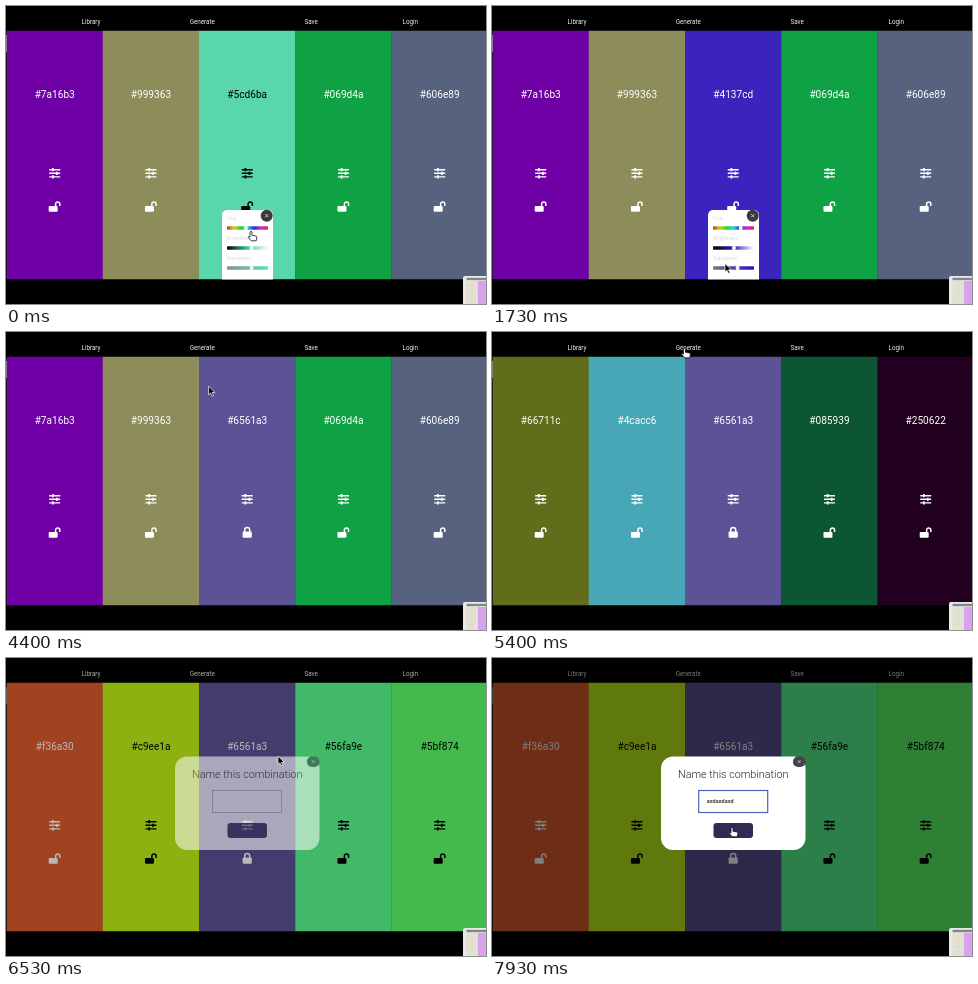
Recreate the animation shown at these times as an HTML page. Size 480 px wide and 298 px high, loop 8000 ms.

```html
<!DOCTYPE html>
<html lang="en">
<head>
<meta charset="utf-8">
<title>Palette generator</title>
<style>
  html, body { margin: 0; width: 100%; height: 100%; overflow: hidden; background: #000; }
  svg { display: block; width: 480px; height: 298px; }
  text { font-family: Roboto, Arial, sans-serif; }
  .nav { font-size: 6.3px; fill: #eee; text-anchor: middle; }
  .hex { font-size: 10.1px; text-anchor: middle; }
  .label { font-size: 5.3px; fill: #d9d9dd; }
  .title { font-size: 10.8px; font-weight: 300; fill: #222; text-anchor: middle; }
  .typed { font-size: 5.5px; font-weight: 500; fill: #222; }
</style>
</head>
<body>
<svg viewBox="0 0 480 298">
  <defs>
    <clipPath id="cols"><rect y="24.5" width="480" height="249"/></clipPath>
    <linearGradient id="hue"></linearGradient>
    <linearGradient id="bright"><stop/><stop offset=".5"/><stop offset="1" stop-color="#fff"/></linearGradient>
    <linearGradient id="sat"><stop/><stop offset="1"/></linearGradient>
    <g id="sliders">
      <path d="M-5.5-3.6h11M-5.5 0h11M-5.5 3.6h11" stroke="currentColor" stroke-width="1.4"/>
      <path d="M-1.8-5.2v3.2M2.2-1.6v3.2M-1.8 2v3.2" stroke="currentColor" stroke-width="1.7"/>
    </g>
    <g id="open">
      <rect x="-6" y="-.4" width="9" height="5.8" rx="1" fill="currentColor"/>
      <path d="M.9.2v-2.4a2.1 2.1 0 0 1 4.2 0v1.9" fill="none" stroke="currentColor" stroke-width="1.5"/>
    </g>
    <g id="shut">
      <rect x="-4.6" y="-.7" width="9.2" height="6.2" rx="1" fill="currentColor"/>
      <path d="M-2.5 0v-2.4a2.5 2.5 0 0 1 5 0V0" fill="none" stroke="currentColor" stroke-width="1.5"/>
    </g>
  </defs>
  <rect width="480" height="298"/>
  <g id="nav"></g>
  <g clip-path="url(#cols)">
    <g id="columns"></g>
    <g id="panel">
      <rect x="216" y="204" width="51" height="80" rx="5" fill="#fff"/>
      <circle cx="260.7" cy="209.7" r="6" fill="#3b3b3f"/>
      <path d="M259.2 208.2l3 3m0-3l-3 3" stroke="#ddd" stroke-width=".9"/>
    </g>
  </g>
  <path d="M.4 25v248" stroke="#222" stroke-width=".8"/>
  <path d="M.4 29v17" stroke="#aaa" stroke-width=".8"/>
  <rect id="dim" width="480" height="298"/>
  <g id="popup">
    <rect x="169" y="98.5" width="144.5" height="93.5" rx="12" fill="#fff"/>
    <rect x="301" y="98.5" width="12.5" height="10.5" rx="5" fill="#45424c"/>
    <path d="M305.8 102.2l2.8 2.8m0-2.8l-2.8 2.8" stroke="#ddd" stroke-width=".7"/>
    <text class="title" x="241.2" y="120">Name this combination</text>
    <rect id="field" x="206.7" y="132.5" width="69" height="22" fill="#fff"/>
    <text id="typed" class="typed" x="214.8" y="145.4"></text>
    <rect x="221.5" y="165" width="39.5" height="15" rx="3" fill="#312a54"/>
  </g>
  <g>
    <rect x="457" y="270" width="30" height="34" rx="2" fill="#e9e9ea"/>
    <path d="M460.500 273h20" stroke="#858585" stroke-width="2.4"/>
    <rect x="460" y="275" width="12" height="23" fill="#e3e1d2"/>
    <rect x="472" y="275" width="8" height="23" fill="#d9a2ec"/>
    <path d="M466 279v18" stroke="#bbb9aa" stroke-dasharray="1 3.500"/>
  </g>
  <g id="cursor">
    <path id="arrow" d="M0 0v8.600l2-1.800 1.500 3.200 1.500-.7-1.500-3h2.800z" fill="#000" stroke="#fff" stroke-width=".7"/>
    <path id="hand" d="M-1 1q1-1.600 2 0v3.200l4 .8q1 .3.9 1.500l-.7 3.300H.2L-2.800 6.300q-.1-1.300 1.800-.3z" fill="#fff" stroke="#111" stroke-width=".8" stroke-linejoin="round"/>
  </g>
</svg>
<script>
const LOOP = 8000, STEP = 1000 / 15;
const $ = id => document.getElementById(id);

function add(parent, tag, attrs, text) {
  const el = document.createElementNS('http://www.w3.org/2000/svg', tag);
  for (const k in attrs) el.setAttribute(k, attrs[k]);
  if (text) el.textContent = text;
  parent.appendChild(el);
  return el;
}

// Eased value(s) at time t from [time, ...values] points.
function track(points, t) {
  let i = 0;
  while (i < points.length - 1 && points[i + 1][0] <= t) i++;
  const a = points[i], b = points[i + 1] || a;
  let u = b === a ? 0 : Math.max(0, (t - a[0]) / (b[0] - a[0]));
  u = u * u * (3 - 2 * u);
  return a.slice(1).map((v, k) => v + (b[k + 1] - v) * u);
}

const HUE = [[70, 166.2], [330, 244]];
const LIGHT = [[600, .6], [870, .35], [1200, .51]];
const SAT = [[2470, .6], [2535, .27], [2800, .12], [3130, .264]];
const PANEL = [[3470, 0], [3970, 72]];
const FADE = [[6310, 0], [6730, 1]];
const PATH = [
  [70, 245, 225], [330, 251, 225], [470, 251, 225], [600, 246, 241],
  [870, 236, 241], [1200, 243, 241], [1270, 248, 241], [1530, 234, 257],
  [1670, 234, 257], [1730, 233, 257.5], [1930, 233, 257.5], [2070, 232, 261],
  [2470, 232, 261], [2800, 226, 261], [3130, 232, 261], [3260, 232, 261],
  [3400, 260, 211], [3600, 260, 211], [3970, 241, 199], [4160, 241, 199],
  [4500, 192.5, 16], [5800, 192.5, 16], [6050, 316.5, 15], [6270, 316.5, 15],
  [6530, 272, 98], [6860, 238, 142], [7000, 238, 142], [7330, 345, 85],
  [7500, 345, 85], [7870, 240, 169]
];
const ARROW = [[1400, 2400], [4170, 4450], [6330, 7800]];
const PALETTES = [
  [0, '7a16b3 999363 069d4a 606e89'],
  [4530, 'b84f7d 2f8a65 d9c25e 3b3f92'],
  [4930, '1c7fa0 e0a58c 7b2d40 a4d178'],
  [5270, '66711c 4cacc6 085939 250622'],
  [5600, '8d3fc1 35524a e3b04b 2b76d6'],
  [5800, 'f36a30 c9ee1a 56fa9e 5bf874']
].map(([at, s]) => [at, s.split(' ')]);

const rgbOf = hex => [0, 2, 4].map(i => parseInt(hex.substr(i, 2), 16));
const hexOf = rgb => rgb.map(v => v.toString(16).padStart(2, '0')).join('');

function hsl(h, s, l) {
  const a = s * Math.min(l, 1 - l);
  return [0, 8, 4].map(n => {
    const k = (n + h / 30) % 12;
    return Math.round(255 * (l - a * Math.max(-1, Math.min(k - 3, 9 - k, 1))));
  });
}

function tint([r, g, b]) {
  const d = g - (r + b) / 2;
  return `rgb(${[r * .91 + Math.max(0, d) * .08, g - 10 + d * .13, b * .92]
    .map(v => Math.round(Math.max(0, Math.min(255, v))))})`;
}

function isLight(rgb) {
  const [r, g, b] = rgb.map(v => (v / 255) ** 2.2);
  return .2126 * r + .7152 * g + .0722 * b > .5;
}

[['Library', 85], ['Generate', 196.3], ['Save', 305.2], ['Login', 404.3]]
  .forEach(([s, x]) => add($('nav'), 'text', { class: 'nav', x, y: 18 }, s));

const columns = [0, 1, 2, 3, 4].map(i => {
  const x = .5 + i * 96.25, mid = x + 48.2;
  const g = add($('columns'), 'g');
  return {
    g,
    bg: add(g, 'rect', { x, y: 24.5, width: 96.5, height: 249 }),
    hex: add(g, 'text', { class: 'hex', x: mid, y: 92, fill: 'currentColor' }),
    icon: add(g, 'use', { href: '#sliders', x: mid, y: 167.3 }),
    lock: add(g, 'use', { href: '#open', x: mid, y: 200.3 })
  };
});

for (let i = 0; i <= 6; i++)
  add($('hue'), 'stop', { offset: i / 6, 'stop-color': `hsl(${i * 60},65%,50%)` });

const knobs = [['Hue', 'hue'], ['Brightness', 'bright'], ['Saturation', 'sat']].map(([name, id], i) => {
  const y = 222 + i * 20;
  add($('panel'), 'text', { class: 'label', x: 221, y: y - 8 }, name);
  add($('panel'), 'rect', { x: 221, y: y - 1.7, width: 41, height: 3.4, rx: .8, fill: `url(#${id})` });
  return add($('panel'), 'ellipse', { cy: y, rx: 2, ry: 2.4, fill: '#f4f4f8' });
});

function paint(col, rgb) {
  col.bg.setAttribute('fill', tint(rgb));
  col.hex.textContent = '#' + hexOf(rgb);
  col.g.style.color = isLight(rgb) ? '#000' : '#fff';
}

function draw(t) {
  const [h] = track(HUE, t), [l] = track(LIGHT, t), [s] = track(SAT, t);
  const palette = PALETTES.filter(p => p[0] <= t).pop()[1].map(rgbOf);
  palette.splice(2, 0, hsl(h, s, l));
  columns.forEach((c, i) => paint(c, palette[i]));
  columns[2].lock.setAttribute('href', t >= 4100 ? '#shut' : '#open');

  const stops = id => $(id).children;
  stops('bright')[1].setAttribute('stop-color', tint(hsl(h, .6, .5)));
  stops('sat')[0].setAttribute('stop-color', tint(hsl(h, 0, l)));
  stops('sat')[1].setAttribute('stop-color', tint(hsl(h, .75, l)));
  [h / 360, l, s].forEach((v, i) => knobs[i].setAttribute('cx', 221 + 41 * v));
  $('panel').setAttribute('transform', `translate(0 ${track(PANEL, t)[0]})`);

  const [fade] = track(FADE, t);
  $('dim').setAttribute('opacity', fade * .5);
  $('popup').setAttribute('opacity', fade);
  const focus = t >= 6930;
  $('field').setAttribute('stroke', focus ? '#4c63b8' : '#777');
  $('field').setAttribute('stroke-width', focus ? 1.2 : .5);
  $('typed').textContent = 'asdasdasd'.slice(0, Math.max(0, Math.floor((t - 7170) / 55)));

  const [x, y] = track(PATH, t);
  const arrow = ARROW.some(([a, b]) => t >= a && t < b);
  $('cursor').setAttribute('transform', `translate(${x} ${y})`);
  $('arrow').style.display = arrow ? '' : 'none';
  $('hand').style.display = arrow ? 'none' : '';
}

const start = performance.now();
function tick() {
  const t = (performance.now() - start) % LOOP;
  draw(Math.floor((t + 5) / STEP) * STEP % LOOP);
  requestAnimationFrame(tick);
}
tick();
</script>
</body>
</html>
```
